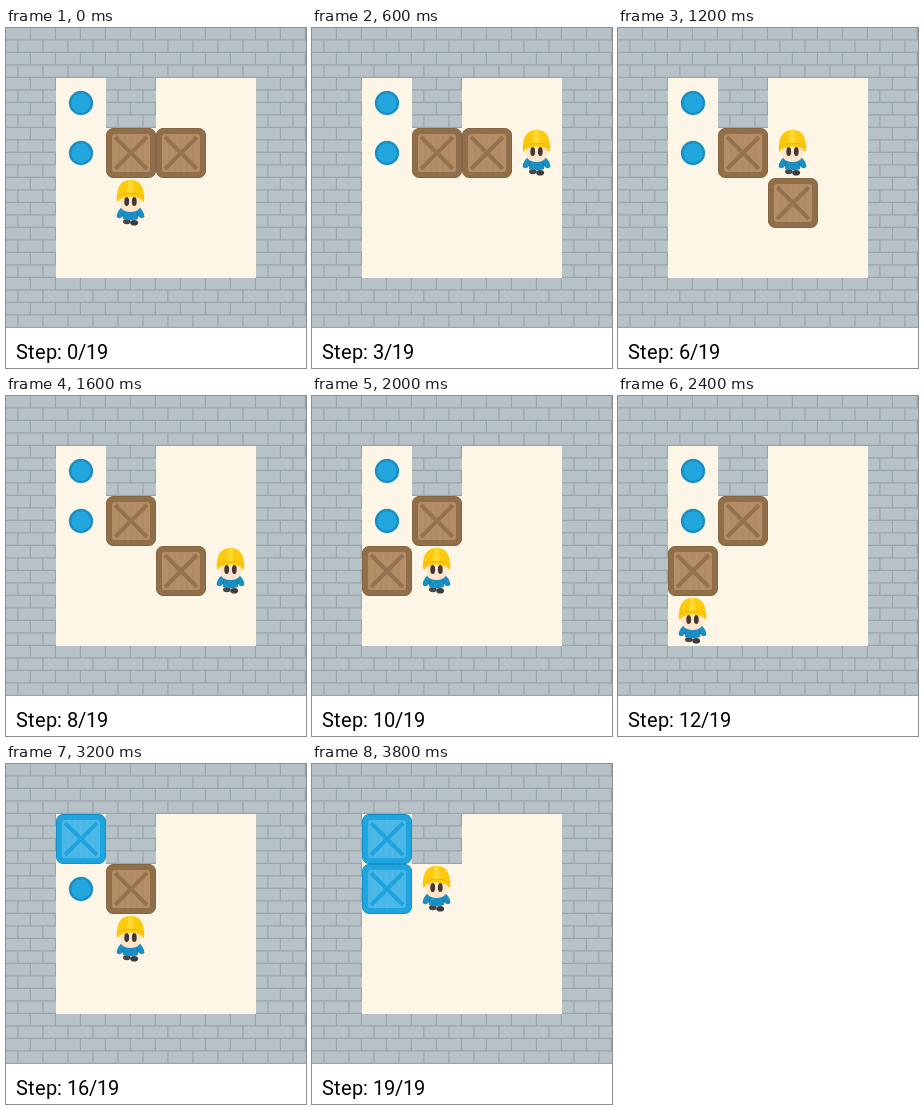
Animation of 300x340 px, one loop 4000 ms. Source, as an HTML page:

```html
<!DOCTYPE html>
<html lang="en">
<head>
<meta charset="utf-8">
<title>Crate puzzle</title>
<style>
  html, body { margin: 0; width: 100%; height: 100%; overflow: hidden; background: #fff; }
  svg { display: block; width: 300px; height: 340px; }
  text { font: 20px Roboto, Arial, sans-serif; fill: #000; }
  .crate { --edge: #876540; --frame: #906e49; --panel: #b38e67; --grain: #ab865f; --brace: #947250; }
  .crate.home { --edge: #178fc4; --frame: #1ea4df; --panel: #4ab7e7; --grain: #5cbfea; --brace: #1fa3de; }
</style>
</head>
<body>
<svg viewBox="0 0 300 340">
  <defs>
    <pattern id="bricks" width="50" height="25" patternUnits="userSpaceOnUse">
      <rect width="50" height="25" fill="#b7c2c8"/>
      <path d="M0 11.9h50M0 24.4h50M24.4 0v12M49.4 0v12M11.9 12v12.5M36.9 12v12.5" stroke="#98a5ab" stroke-width="1.2" fill="none"/>
    </pattern>
    <g id="crate">
      <rect x=".5" y=".5" width="49" height="49" rx="6.5" fill="var(--frame)" stroke="var(--edge)"/>
      <rect x="6" y="6" width="38" height="38" rx="2.5" fill="var(--panel)"/>
      <path d="M13 6v38M19 6v38M25 6v38M31 6v38M37 6v38" stroke="var(--grain)" stroke-width=".8"/>
      <path d="M9 9l32 32M41 9l-32 32" stroke="var(--brace)" stroke-width="4"/>
    </g>
    <g id="worker">
      <ellipse cx="20.8" cy="43.6" rx="3.8" ry="2.7" fill="#46474a"/>
      <ellipse cx="28.2" cy="44.8" rx="3.9" ry="2.8" fill="#3b3c3f"/>
      <path d="M16 29Q11 33 10.6 38.5Q12 41.5 15.5 39.5L17 38V41Q24.5 43.5 32 41V38L33.5 39.5Q37 41.5 38.4 38.5Q38 33 33 29Z" fill="#1a8fc4"/>
      <path d="M17 38l.8-4M32 38l-.8-4" stroke="#1577a6" fill="none"/>
      <path d="M14 19H35V26Q34 34 24.5 34Q15 34 14 26Z" fill="#fde6cd"/>
      <ellipse cx="20.7" cy="23.4" rx="2.4" ry="4.5" fill="#45382f"/>
      <ellipse cx="28.3" cy="23.4" rx="2.4" ry="4.5" fill="#45382f"/>
      <path d="M11.2 23.5Q10 20 11.2 15Q13 2 24.5 2T37.8 15Q39 20 37.8 23.5Q35.6 23.8 35 21Q30 18.5 24.5 18.5T14 21Q13.4 23.8 11.2 23.5Z" fill="#fbc90d"/>
      <path d="M11.5 18.5Q17 15 24.5 15T37.5 18.5" fill="none" stroke="#efb908"/>
      <path d="M21.3 15L22 2.4Q24.5 1.6 27 2.4L27.7 15Z" fill="#ffd92b"/>
    </g>
  </defs>
  <rect width="300" height="300" fill="url(#bricks)"/>
  <path d="M50 50H100V100H150V50H250V250H50Z" fill="#fdf5e6"/>
  <g fill="#22a6de" stroke="#1b8fc4" stroke-width="2.5">
    <circle cx="75" cy="75" r="10.9"/>
    <circle cx="75" cy="125" r="10.9"/>
  </g>
  <use class="crate" href="#crate"/>
  <use class="crate" href="#crate"/>
  <use id="player" href="#worker"/>
  <text id="label" x="10" y="331" xml:space="preserve">Step: 0/19</text>
</svg>
<script>
const CELL = 50, STEP_MS = 200, TEXT_X = 10;
const MOVES = 'RRUULDRDLLDLUUDRRUL';
const DIRS = { R: [1, 0], L: [-1, 0], U: [0, -1], D: [0, 1] };
const isGoal = ([x, y]) => x === 1 && (y === 1 || y === 2);
const add = (a, b) => [a[0] + b[0], a[1] + b[1]];
const same = (a, b) => a[0] === b[0] && a[1] === b[1];

// Each state follows from the last: a crate in the way is pushed.
const states = [{ player: [2, 3], crates: [[2, 2], [3, 2]] }];
for (const move of MOVES) {
  const last = states[states.length - 1], dir = DIRS[move];
  const player = add(last.player, dir);
  const crates = last.crates.map(c => same(c, player) ? add(c, dir) : c);
  states.push({ player, crates });
}

const playerEl = document.getElementById('player');
const label = document.getElementById('label');
const crateEls = document.querySelectorAll('.crate');
const place = (el, [x, y]) => el.setAttribute('transform', `translate(${x * CELL} ${y * CELL})`);

const ruler = document.createElement('canvas').getContext('2d');
ruler.font = '20px Roboto, Arial, sans-serif';

// Glyphs advance by whole pixels.
function write(text) {
  let x = TEXT_X;
  const xs = [...text].map(ch => {
    const left = x;
    x += Math.round(ruler.measureText(ch).width);
    return left;
  });
  label.setAttribute('x', xs.join(' '));
  label.textContent = text;
}

let shown = -1;
function draw(now) {
  const step = Math.floor(now / STEP_MS) % states.length;
  if (step === shown) return;
  shown = step;
  const { player, crates } = states[step];
  place(playerEl, player);
  crates.forEach((c, i) => {
    place(crateEls[i], c);
    crateEls[i].classList.toggle('home', isGoal(c));
  });
  write(`Step: ${step}/${MOVES.length}`);
}

const start = performance.now();
function tick() {
  draw(performance.now() - start);
  requestAnimationFrame(tick);
}
tick();
</script>
</body>
</html>
```
